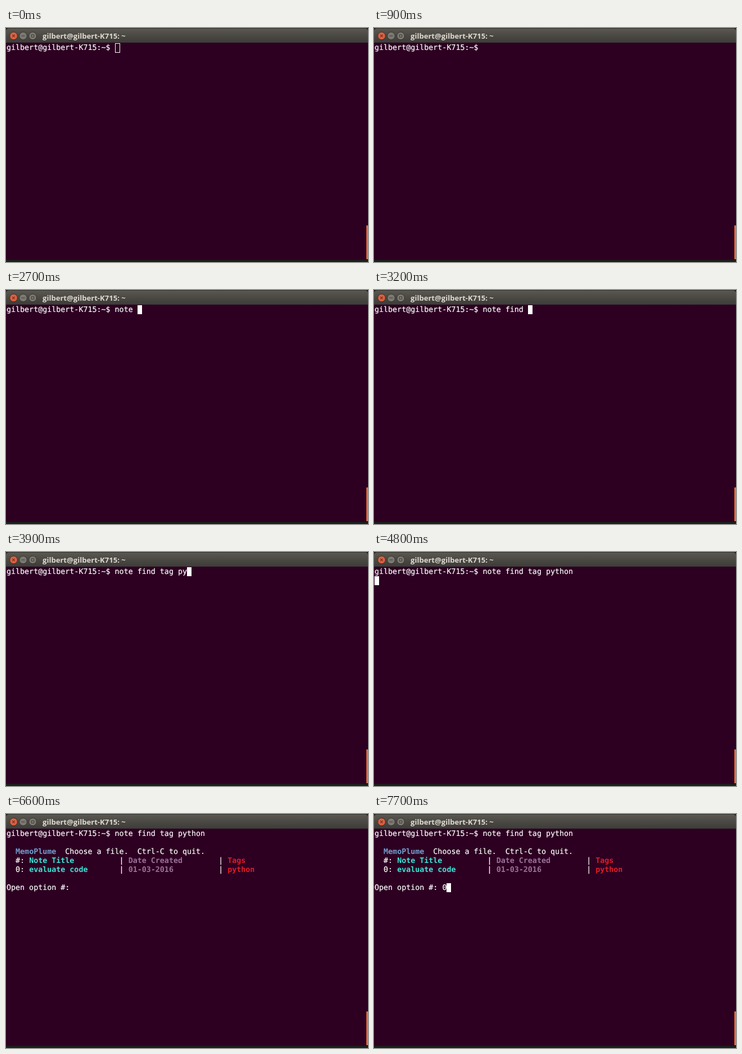
Animation, 644 px wide and 416 px high, one loop 8000 ms. Source, as an HTML page:

```html
<!DOCTYPE html>
<html lang="en">
<head>
<meta charset="utf-8">
<title>Terminal</title>
<style>
  html, body { margin: 0; width: 100%; height: 100%; overflow: hidden; background: #1d1e1a; }

  .window { position: absolute; left: 0; top: 0; width: 644px; height: 416px; overflow: hidden; background: #1d1e1a; }

  .bar {
    position: absolute; inset: 0 0 auto; height: 26px; box-sizing: border-box;
    background: linear-gradient(#5a5850, #4c4a44 45%, #3d3c38);
    border-top: 1px solid #33322e; border-radius: 5px 5px 0 0;
  }
  .bar svg { position: absolute; left: 0; top: -1px; }
  .bar b {
    position: absolute; left: 65px; top: 4px; white-space: pre;
    font: 700 13.1px/18px "Open Sans", "Noto Sans", sans-serif; color: #dfdbd2;
  }

  .screen {
    position: absolute; left: 0; top: 26px; width: 644px; height: 386px;
    box-sizing: border-box; padding: 2px 0 0 1px; background: #2d0022; color: #fff;
    font: 13.333px/16px "DejaVu Sans Mono", monospace;
    text-rendering: geometricPrecision; -webkit-text-stroke: .2px;
  }
  .thumb { position: absolute; left: 641px; top: 351px; width: 3px; height: 60px; background: #df6d45; }

  .line { display: flex; height: 16px; white-space: pre; }
  .line > span { flex: none; overflow: hidden; }
  pre { margin: 0; font: inherit; }
  b { -webkit-text-stroke: 0; }
  .app { color: #729fcf; }
  .title { color: #3ce4d8; }
  .date { color: #9c7199; }
  .tag { color: #e01c28; }

  .cursor { flex: none; width: 1ch; height: 16px; margin: -1px -1ch 0 0; background: #fff; }

  /* A slight lead keeps each change on its own side of the tenth of a second. */
  .cmd, .reply, .cursor, .output { animation: 8s -4ms step-end infinite; }
  .cmd { animation-name: type; }
  .reply { animation-name: answer; }
  .at-shell { animation-name: shell; }
  .at-wait { animation-name: wait; }
  .at-prompt { animation-name: prompt; }
  .output { animation-name: show; }

  @keyframes type {
    0% { width: 0; }
    27.5% { width: 0; animation-timing-function: steps(10); }
    40% { width: 10ch; }
    42.5% { width: 12ch; }
    43.75% { width: 12ch; animation-timing-function: steps(5); }
    50% { width: 17ch; }
    51.25% { width: 19ch; }
    53.75%, 100% { width: 20ch; }
  }
  @keyframes answer {
    0% { width: 0; }
    96.25%, 100% { width: 1ch; }
  }
  /* Hollow while unfocused, then blinking 600 ms on and off until a key is hit. */
  @keyframes shell {
    0% { visibility: visible; width: 9px; height: 17px; background: none; box-shadow: inset 0 0 0 1px #fff; }
    3.75% { visibility: visible; width: 1ch; height: 16px; background: #fff; box-shadow: none; }
    11.25% { visibility: hidden; }
    18.75% { visibility: visible; }
    26.25% { visibility: hidden; }
    28.75% { visibility: visible; }
    58.75%, 100% { visibility: hidden; width: 1ch; height: 16px; background: #fff; box-shadow: none; }
  }
  @keyframes wait {
    0% { visibility: hidden; }
    58.75% { visibility: visible; }
    62.5%, 100% { visibility: hidden; }
  }
  @keyframes prompt {
    0% { visibility: hidden; }
    62.5% { visibility: visible; }
    67.5% { visibility: hidden; }
    75% { visibility: visible; }
    82.5% { visibility: hidden; }
    90%, 100% { visibility: visible; }
  }
  @keyframes show {
    0% { opacity: 0; }
    62.5%, 100% { opacity: 1; }
  }
</style>
</head>
<body>
<div class="window">
  <div class="bar">
    <svg width="60" height="26" fill="none">
      <g stroke="#34332f">
        <circle cx="13.5" cy="14" r="6.8" fill="#de6040"/>
        <circle cx="30.5" cy="14" r="6.8" fill="#7b7971"/>
        <circle cx="47.5" cy="14" r="6.8" fill="#7b7971"/>
      </g>
      <path d="M11.3 11.8l4.4 4.4m0-4.4l-4.4 4.4" stroke="#6b2c1a" stroke-width="1.1"/>
      <path d="M27.5 14h6M45.3 11.8h4.4v4.4h-4.4z" stroke="#3a3934"/>
    </svg>
    <b>gilbert@gilbert-K715: ~</b>
  </div>
  <div class="screen">
    <div class="line"><span>gilbert@gilbert-K715:~$ </span><span class="cmd">note find tag python</span><i class="cursor at-shell"></i></div>
    <div class="line"><i class="cursor at-wait"></i></div>
    <div class="output">
<pre>  <b class="app">MemoPlume</b>  Choose a file.  Ctrl-C to quit.
  #: <b class="title">Note Title</b>          | <b class="date">Date Created</b>        | <b class="tag">Tags</b>
  0: <b class="title">evaluate code</b>       | <b class="date">01-03-2016</b>          | <b class="tag">python</b>
</pre>
      <div class="line"></div>
      <div class="line"><span>Open option #: </span><span class="reply">0</span><i class="cursor at-prompt"></i></div>
    </div>
  </div>
  <div class="thumb"></div>
</div>
</body>
</html>
```
